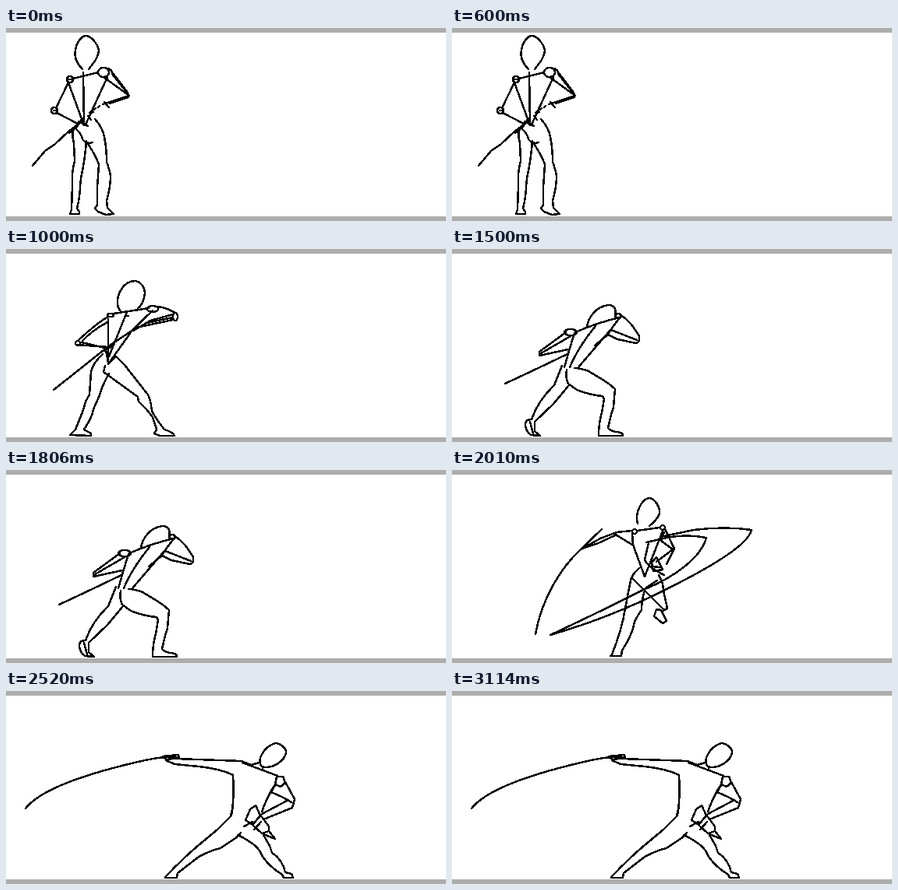
Recreate the animation shown at these times as an HTML page. Size 564 by 248 pixels, loop 3.51 s.

```html
<!DOCTYPE html>
<html lang="en">
<head>
<meta charset="utf-8">
<title>Sword swing</title>
<style>
html, body { margin: 0; width: 100%; height: 100%; overflow: hidden; background: #fff; }
svg { display: block; width: 564px; height: 248px; }
.pose { display: none; fill: none; stroke: #000; stroke-width: 2.5; stroke-linejoin: round; stroke-linecap: round; shape-rendering: crispEdges; }
.pose.on { display: inline; }
</style>
</head>
<body>
<svg viewBox="0 0 564 248">
  <path fill="#adadad" d="M0 0H564V6H0ZM0 242H564V248H0Z"/>
  <!-- standing, hand on hip -->
  <g class="pose on">
    <path d="M98 53C91 46 87 38 89 28C91 17 97 10 103 10C110 11 117 20 119 28C119 38 111 46 106 53"/>
    <circle cx="82" cy="66" r="4"/><path d="M80 66h4"/>
    <ellipse cx="125" cy="57" rx="7" ry="6"/>
    <circle cx="62" cy="106" r="4"/><path d="M61 106h3"/>
    <path d="M86 65L118 57M99 57L100 124M80 70L100 125M130 63L102 124M80 70L64 103M65 109L92 123"/>
    <path d="M130 52Q136 53 136 59L158 87L125 63M134 54L156 83M157 87L139 93L124 98M157 89L133 97M126 95L132 102M120 100l-2 2M115 103L107 109l5-1M105 113l4 5M93 120l12 6M98 116l-6 8"/>
    <path d="M95 122L80 133L63 149L50 158L34 177M92 126L81 135"/>
    <path d="M89 127Q83 133 87 148L88 171Q84 185 85 203L84 233L82 239H94V236L91 232Q95 215 95 203Q96 190 99 178Q102 160 103 145"/>
    <path d="M90 130Q97 136 98 143Q103 150 111 147M103 146Q113 160 119 175L117 205V227L114 232L118 236L128 240L138 239L130 231L129 222Q134 205 134 190Q133 183 129 172Q129 155 126 140Q124 128 114 117"/>
  </g>
  <!-- lunging forward -->
  <g class="pose">
    <path d="M147 80C141 74 142 62 147 53C152 44 160 41 166 41C174 43 178 50 178 57C177 66 173 74 169 76"/>
    <ellipse cx="188" cy="77" rx="7" ry="4"/><ellipse cx="217" cy="87" rx="3" ry="5"/>
    <ellipse cx="134" cy="85" rx="4" ry="2"/><circle cx="92" cy="121" r="3"/>
    <path d="M138 83L183 76M194 74Q205 75 217 82M214 84L185 92L163 105M214 91L167 101M214 88L180 95"/>
    <path d="M131 87Q118 94 93 117M130 94Q110 105 98 118M97 120L131 128M90 123L131 126"/>
    <path d="M61 181L90 158L130 126L160 106L188 79M131 90V148M155 81L132 138M160 107L131 148M155 86h2M125 131l11-6M128 130l3 16"/>
    <path d="M124 135Q111 147 109 158L107 187L102 196L99 207L89 232L82 239L109 240V237L100 232Q111 215 112 206L120 188Q122 178 132 160"/>
    <path d="M127 150L125 158L169 190L170 196L180 206L188 216L193 232L190 237L197 240H216Q214 235 203 232Q192 218 187 208Q185 190 181 186Q170 172 152 149L141 138L131 148"/>
  </g>
  <!-- crouched, blade behind -->
  <g class="pose">
    <path d="M173 101C174 88 185 74 200 72C207 72 211 76 209 83"/>
    <ellipse cx="213" cy="86" rx="4" ry="3"/><ellipse cx="152" cy="107" rx="8" ry="4"/>
    <path d="M215 88Q185 95 158 107M68 173L100 158L148 135"/>
    <path d="M217 85Q228 94 233 101L240 112Q241 120 236 121L212 116L200 110L183 124M237 117L204 104L198 111M215 88L204 103Q185 125 162 152"/>
    <path d="M146 107L112 132V137L149 129M114 134L152 112"/>
    <path d="M157 108Q150 130 144 152M184 99Q165 122 154 145L151 152"/>
    <path d="M141 150L131 175Q110 195 102 219Q94 219 94 225Q94 234 101 239L113 240L106 234V222L130 199Q146 180 149 176M100 222L104 237"/>
    <path d="M147 155Q145 165 149 173L160 181Q178 188 193 189L195 193L192 210Q188 225 188 240H219Q219 235 210 235Q202 233 200 230Q203 215 207 203L209 180Q203 174 190 166L175 157Q165 153 157 153"/>
  </g>
  <!-- sweeping slash with trail -->
  <g class="pose">
    <path d="M238 69C234 55 243 38 252 36C260 36 266 47 266 54C266 60 258 68 253 72"/>
    <circle cx="234" cy="79" r="3"/><circle cx="270" cy="74" r="3"/>
    <path d="M237 78L266 74M231 78L211 80L190 88L165 102L192 76M208 82L231 96M211 83L190 93L167 101"/>
    <path d="M165 102C140 125 115 165 107 211"/>
    <path d="M126 212Q205 189 275 153Q378 102 384 77Q350 72 310 77L272 85"/>
    <path d="M126 212Q190 182 245 154C290 136 320 110 326 87Q300 82 275 87L249 93"/>
    <path d="M231 81L232 96L247 137L271 76M273 76L285 101L275 121M272 80L268 91L283 102L262 118M252 94L247 115Q250 124 272 135M256 119L262 112L270 128L258 130ZM256 124l10 1"/>
    <path d="M240 126Q230 135 229 142L222 178Q218 205 205 237L203 239H217L218 232Q232 210 234 195Q239 185 243 180Q243 165 248 152"/>
    <path d="M231 139L248 156L271 179M248 152L263 142M265 135Q271 145 271 155L276 178L270 181M262 179L259 188L270 197L275 194L268 180Z"/>
  </g>
  <!-- follow-through -->
  <g class="pose">
    <path d="M327 96C322 88 330 72 345 67C352 67 360 74 359 80C356 90 345 97 335 98Q329 99 327 96"/>
    <path d="M25 151C45 125 110 105 165 92Q190 86 204 85M201 84L221 82L222 86L206 88ZM206 85h15"/>
    <path d="M218 87Q250 88 302 90L314 95L325 92M205 89L216 94L247 97Q275 100 291 108Q293 135 289 160M303 92L348 109M330 97L328 102M291 149L288 160"/>
    <path d="M347 110H355L358 118L352 123L345 120ZM358 117L370 139L367 150L330 165M345 121L340 130Q355 136 366 143M362 140L328 158M345 120Q335 135 328 155"/>
    <path d="M320 147L313 152L307 166L316 172L326 160ZM305 174L316 168M316 172L328 183L337 180L345 190L330 184M325 158L337 174V180M318 178L327 168"/>
    <path d="M289 160L271 178L247 198Q229 213 205 238L204 240H219L220 234L247 213Q262 205 275 202L297 187L301 182"/>
    <path d="M297 185Q318 195 325 205Q332 222 354 236L356 240H368L366 235L358 233Q354 216 341 208L338 199L330 185"/>
  </g>
</svg>
<script>
const ends = [1000, 1500, 2010, 2520, 3510];
const poses = document.querySelectorAll('.pose');
const start = performance.now();

function draw() {
  const t = (performance.now() - start) % 3510;
  const now = ends.findIndex(end => t < end);
  poses.forEach((pose, i) => pose.classList.toggle('on', i === now));
  requestAnimationFrame(draw);
}
draw();
</script>
</body>
</html>
```
